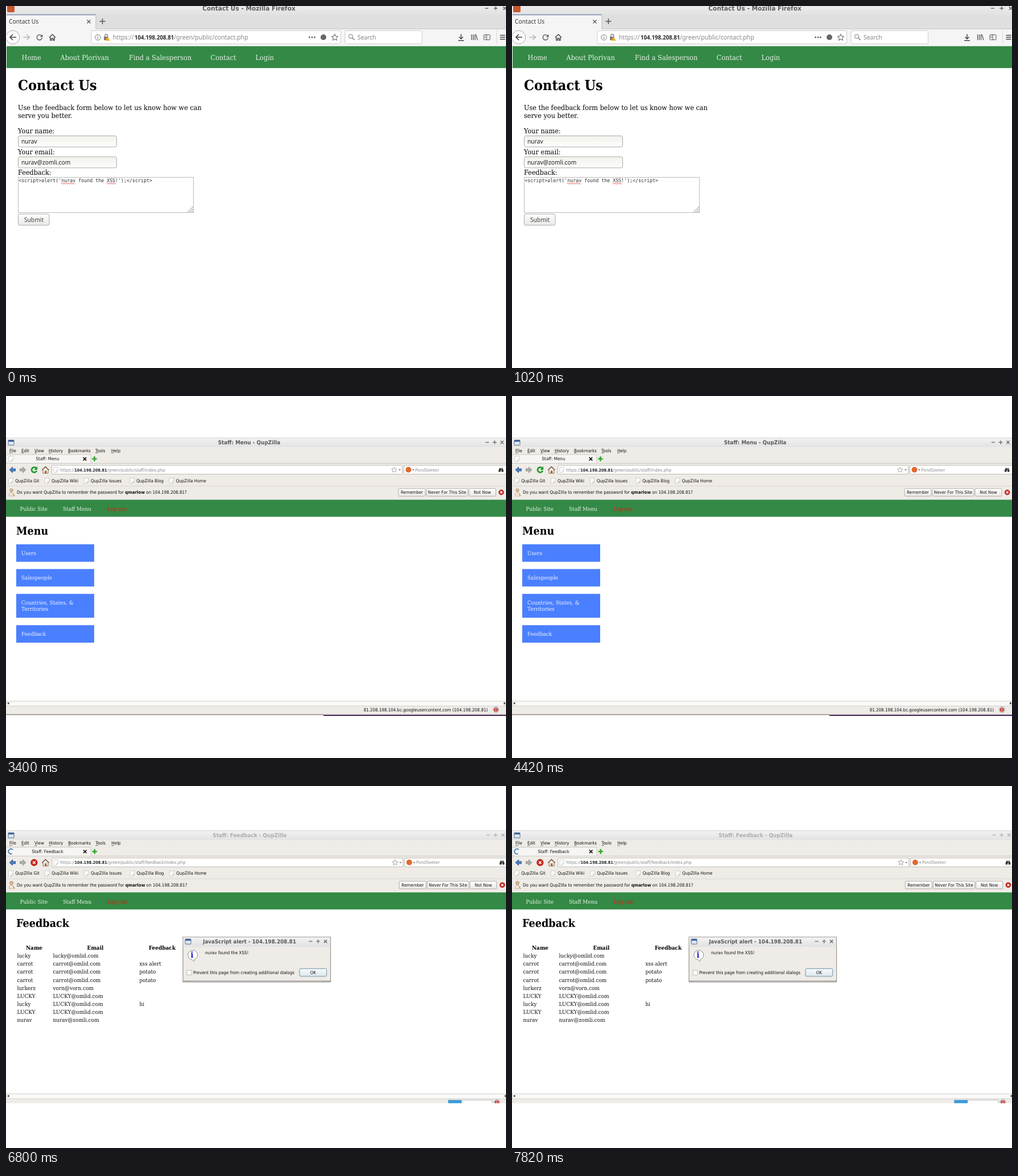
Animation of 879x637 px, one loop 8.5 s. Source, as an HTML page:

```html
<!DOCTYPE html>
<html lang="en">
<head>
<meta charset="utf-8">
<title>Feedback form walkthrough</title>
<style>
html, body { margin: 0; width: 100%; height: 100%; overflow: hidden; background: #fff }
svg { display: block; width: 879px; height: 637px }
text { text-rendering: geometricPrecision }
.serif { font-family: "DejaVu Serif", serif }
.sans { font-family: "DejaVu Sans", sans-serif }
.ui { font-family: "Noto Sans", "Open Sans", sans-serif }
.mono { font-family: "DejaVu Sans Mono", monospace }
.b { font-weight: bold }
.mid { text-anchor: middle }
.end { text-anchor: end }
</style>
</head>
<body>
<svg id="stage" viewBox="0 0 879 637"></svg>
<script>
const SQUEEZE = 0.917;
const HOLD = 1700;
const GREEN = '#338945', PANEL = '#efebe7', GREY = '#58585a';
const HOST = '104.198.208.81';

const text = (x, y, size, str, cls = 'sans', fill = '#111') =>
  `<text transform="translate(${x} ${y}) scale(${SQUEEZE} 1)" font-size="${size}" class="${cls}" fill="${fill}">${str}</text>`;
const rect = (x, y, w, h, fill, stroke = 'none', r = 0) =>
  `<rect x="${x}" y="${y}" width="${w}" height="${h}" fill="${fill}" stroke="${stroke}" rx="${r}"/>`;
const dot = (x, y, r, fill, stroke = 'none') =>
  `<circle cx="${x}" cy="${y}" r="${r}" fill="${fill}" stroke="${stroke}"/>`;
const path = (d, stroke = GREY, width = 1.3, fill = 'none') =>
  `<path d="${d}" fill="${fill}" stroke="${stroke}" stroke-width="${width}"/>`;
const solid = (d, fill) => path(d, 'none', 0, fill);
const group = (transform, ...parts) => `<g transform="${transform}">${parts.join('')}</g>`;
const cross = (x, y, r, color, w) =>
  path(`M${x - r} ${y - r}l${2 * r} ${2 * r}m0 ${-2 * r}l${-2 * r} ${2 * r}`, color, w);
const plus = (x, y, r, color, w) => path(`M${x - r} ${y}h${2 * r}M${x} ${y - r}v${2 * r}`, color, w);
const windowButtons = (x, y, gap, color) =>
  path(`M${x - 3} ${y}h6`, color, 1.4) + plus(x + gap, y, 3.3, color, 1.4) + cross(x + 2 * gap, y, 2.7, color, 1.5);
const each = (list, draw) => list.map(draw).join('');
const squiggle = (x, y, w) => path(`M${x} ${y}` + 'q1 -2 2 0t2 0'.repeat(Math.round(w / 4)), '#e02020', 0.9);
const magnifier = (x, y) => dot(x, y, 3.6, 'none', '#777') + path(`M${x + 2.6} ${y + 2.6}l4 4`, '#777', 1.4);
const star = (x, y, r, color) => {
  const points = Array.from({ length: 10 }, (_, i) => {
    const a = i * Math.PI / 5, d = i % 2 ? r * 0.48 : r;
    return `${(x + d * Math.sin(a)).toFixed(1)} ${(y - d * Math.cos(a)).toFixed(1)}`;
  });
  return path(`M${points.join('L')}Z`, color, 1);
};

// First browser
function visitor(title, file) {
  const input = '#fff', line = '#cdcdcd';
  return [
    rect(0, -12, 900, 27, 'url(#bar)'),
    rect(2, -2, 13, 13, '#c8572c', 'none', 2),
    text(427, 8, 11.5, `${title} - Mozilla Firefox`, 'sans b mid', '#5c5c5c'),
    windowButtons(845, 4, 15.8, '#666'),
    rect(0, 15, 900, 25.5, '#dfdfdf'),
    rect(0, 15, 158, 26, '#f5f5f5'), rect(0, 14.5, 158, 1.8, '#8d99b3'),
    path('M158 15v25.5H900', '#bdbdbd', 1),
    text(5, 31, 11.2, title, 'ui', '#3a3a3a'),
    cross(145.5, 27.5, 3, '#555', 1.3), plus(169.5, 27, 5, '#555', 1.5),
    rect(0, 40.8, 900, 30.4, '#f5f5f5'),
    dot(12, 55, 11.8, '#fcfcfc', '#aaa'),
    path('M18 55H7M12 50L7 55l5 5', '#444', 1.6),
    path('M30.5 55h10.5M36.5 50.5l5 4.5-5 4.5', '#b5b5b5', 1.5),
    path('M62.4 52.2a4.6 4.6 0 1 0 1 4', '#555', 1.4), solid('M64.5 50v4.6h-4.6z', '#555'),
    path('M76 55.5L81.5 50l5.5 5.5M78 55v5.3h2.2v-3.3h2.6v3.3H85V55', '#444', 1.4),
    rect(150, 43.5, 438.5, 23, input, line, 2),
    dot(161.5, 55.3, 4.8, 'none', '#777'), path('M161.5 54.5v3.5M161.5 52v1.3', '#777', 1.2),
    path('M173.8 54v-1.6a2.4 2.8 0 0 1 4.8 0V54', '#777', 1.3), rect(172.2, 54, 7.6, 6, '#777'),
    solid('M178.5 53.5l4.2 7.5h-8.4z', '#f0ae20'),
    text(188, 59.2, 11.6, 'https://', 'ui', '#888'),
    text(226, 59.2, 10.6, HOST, 'ui b', '#2b2b2b'),
    text(295, 59.2, 11.6, `/green/public/${file}`, 'ui', '#888'),
    each([533.5, 538, 542.5], x => dot(x, 55, 1.5, '#666')),
    dot(558, 55, 5, '#666'), star(578, 55.5, 6, '#555'),
    rect(596, 43.5, 135.5, 23, input, line, 2), magnifier(606, 53.5),
    text(618, 59.2, 11.2, 'Search', 'ui', '#858585'),
    path('M800 49.5v8M796.5 54.5l3.5 3.5 3.5-3.5M795 60.8h10', '#444', 1.5),
    path('M818.5 50v10M821.5 50v10M824.5 50v10M826 50l3 10', '#555', 1.3),
    rect(840, 50.5, 11, 9, 'none', '#555', 1.5), path('M845 50.5v9M841.5 53h2M841.5 55.5h2', '#555', 1),
    path('M862.5 43v24', '#d8d8d8', 1), path('M868.5 51.5h9M868.5 55h9M868.5 58.5h9', '#444', 1.5),
    rect(0, 70.7, 900, 38.5, GREEN),
    each([[27.5, 'Home'], [95.5, 'About Plorivan'], [216, 'Find a Salesperson'], [359.5, 'Contact'], [438.5, 'Login']],
      ([x, s]) => text(x, 95.3, 12.4, s, 'serif', '#e8f2e8')),
    text(21, 148.3, 24.6, title, 'serif b', '#000')
  ].join('');
}

const paragraph = (...lines) => each(lines, (s, i) => text(21, 182.6 + i * 14.6, 12.3, s, 'serif', '#000'));

function contactForm() {
  const field = (y, label, value) =>
    text(21, y - 4, 12.3, label, 'serif', '#000') +
    rect(21.5, y + .5, 173, 19.5, 'url(#field)', '#aaa', 3) + text(27, y + 14.2, 11.2, value, 'ui', '#222');
  return [
    paragraph('Use the feedback form below to let us know how we can', 'serve you better.'),
    field(228, 'Your name:', 'nurav'),
    field(264.8, 'Your email:', 'nurav@zomli.com'),
    text(21, 297.4, 12.3, 'Feedback:', 'serif', '#000'),
    rect(21.5, 301.5, 308, 62, '#fff', '#bbb'),
    text(22.3, 310.4, 9.06, "&lt;script&gt;alert('nurav found the XSS!');&lt;/script&gt;", 'mono', '#333'),
    squiggle(97, 312.5, 25), squiggle(177, 312.5, 15),
    path('M319 363l10-10M323 363l6-6M326.5 363l2.5-2.5', '#888', 1),
    rect(21.5, 366, 54.5, 19.8, 'url(#button)', '#aaa', 3),
    text(49, 380, 11.2, 'Submit', 'ui mid', '#444'),
    rect(0, 0, 1, 637, '#fff')
  ].join('');
}

// Second browser
const sheet = (x, y) => path(`M${x - 3.8} ${y - 4.5}h7.6v6l-3 3.5h-4.6zM${x + 3.8} ${y + 1.5}h-3v3.5`, '#bdbdbd', 0.7, '#fcfcfc');
const stop = (x, y, r) => dot(x, y, r, '#cf2a20', '#a8180f') + cross(x, y, r * .4, '#fff', 1.5);
const windowIcon = (x, y) => rect(x, y, 10, 9, '#dde6f1', '#5a6f8e', 1) + rect(x, y, 10, 3, '#3c659f');
const button = (x, y, w, label, stroke = '#b3afaa', fill = 'url(#button)') =>
  rect(x, y, w, 13.5, fill, stroke, 2) + text(x + w / 2, y + 9.6, 7.78, label, 'sans mid');

function staffWindow(page, url, busy) {
  const ink = busy ? '#adadad' : '#5a5a5a';
  const small = (x, y, s, cls, fill) => text(x, y, 7.78, s, cls, fill);
  const arrow = (x, dir, fill, edge) =>
    path(`M${x - 5.5 * dir} 130l${5.5 * dir} -5v3h${5 * dir}v4h${-5 * dir}v3z`, edge, 0.8, fill);
  return [
    rect(0, 73.5, 900, 17, 'url(#bar)'), path('M0 73.8H900', '#cfcfcf', .8),
    windowIcon(4, 77.5),
    text(427.5, 85, 9.7, `Staff: ${page} - QupZilla`, 'sans b mid', ink),
    windowButtons(846, 81.5, 13, busy ? '#b5b5b5' : '#707070'),
    rect(0, 90.5, 900, 92, PANEL),
    each([[6, 'File'], [27, 'Edit'], [50, 'View'], [75, 'History'], [109, 'Bookmarks'], [157, 'Tools'], [185, 'Help']],
      ([x, s]) => small(x, 98.7, s) + path(`M${x} 100.2h4.5`, '#333', .7)),
    rect(0, 103, 149, 15.5, '#f7f5f3', '#cbc6c0', 1), path('M149 118.5H900', '#cbc6c0', 1),
    busy ? path('M12 107.5A4.4 4.4 0 1 0 10.5 114.5', '#3e79b8', 1.8) : sheet(9, 110.5),
    small(73, 113.2, `Staff: ${page}`, 'sans mid'),
    cross(138.5, 110.7, 2.8, '#222', 1.8), plus(155.5, 110.5, 4.2, '#37a834', 2.6),
    arrow(11.5, 1, '#4b80c2', '#1f4c85'), arrow(29.5, -1, '#aab0aa', '#858c85'),
    busy ? stop(49.3, 130, 5.6)
      : path('M53 127a4.5 4.5 0 1 0 .8 4.5', '#249a35', 2.8) + solid('M55.2 123.8v6.2h-6z', '#249a35'),
    path('M65 130v6h9v-6', '#8a7050', 1, '#f5eddf'), path('M63.2 130.5l6.1-6 6.1 6', '#6b4a38', 1.4),
    rect(68.2, 131.5, 3, 4.5, '#9a5b2c'),
    rect(80.5, 122, 616, 15.5, '#fff', '#bfbab4', 1), sheet(87.5, 129.8),
    small(95, 132.6, 'https://', 'sans', '#888'),
    text(120.3, 132.6, 7.1, HOST, 'sans b', '#222'),
    small(177.3, 132.6, `/green/public/staff/${url}`, 'sans', '#888'),
    star(682.5, 130, 5, '#aaa'), solid('M690 129h4l-2 2.5z', '#777'),
    rect(699.5, 122, 190, 15.5, '#fff', '#bfbab4', 1),
    dot(707.5, 129.8, 5, '#e0692f'), solid('M714 129h4l-2 2.5z', '#777'),
    small(719.5, 132.6, 'PondSeeker', 'sans', '#909090'),
    solid('M866 133.5v-3l2-4h1.5v7zM874.5 133.5v-3l-2-4H871v7zM869 128h2.5v3H869z', '#333'),
    each([[8.5, 'Git'], [72.3, 'Wiki'], [141.2, 'Issues'], [221.5, 'Blog'], [291, 'Home']],
      ([x, s]) => sheet(x, 149) + small(x + 7.7, 151.7, `QupZilla ${s}`)),
    path('M0 158.5H900', '#d8d3cd', .8),
    dot(9.5, 166, 2.7, '#e4c09c', '#b08858'), path('M5.5 176v-4q4-4 8 0v4z', '#b5aaa0', .8, '#eee6dd'),
    path('M12 172l3.5 4', '#d89a48', 1.4),
    small(19, 172.3, `Do you want QupZilla to remember the password for <tspan class="b">qmarlow</tspan> on ${HOST}?`),
    button(690, 162.8, 47, 'Remember'), button(739, 162.8, 73, 'Never For This Site'), button(814, 162.8, 47, 'Not Now'),
    stop(870.7, 169.5, 4.3),
    rect(0, 182.5, 900, 30, GREEN),
    text(24.5, 202, 9.7, 'Public Site', 'serif', '#e8f2e8'),
    text(100, 202, 9.7, 'Staff Menu', 'serif', '#e8f2e8'),
    text(178, 202, 9.7, 'Log out', 'serif', '#e4180f'),
    text(18, 243.6, 19.2, page, 'serif b', '#000'),
    rect(0, 536.5, 900, 25, PANEL), rect(.5, 537, 877, 8.5, '#faf9f8', '#d5d1cc'),
    solid('M5.5 538.5v4.5l-3.5-2.2z', '#444'), solid('M875 538.5v4.5l3.5-2.2z', '#444'),
    busy
      ? rect(776, 548, 77, 12, '#fff', '#bbb') + rect(776, 548, 23.5, 12, '#399bdd')
      : small(847, 555, `81.208.198.104.bc.googleusercontent.com (${HOST})`, 'sans end'),
    dot(861.3, 552, 4.8, '#d9d4cf', '#999'), dot(861.3, 552, 3.3, '#c92b24'), path('M861.3 549.8v4', '#fff', 1.2)
  ].join('');
}

function menuPage() {
  const item = (y, h, ...lines) => rect(18, y, 137, h, '#4a7fff') +
    each(lines, (s, i) => text(27, y + 18.6 + i * 11.5, 9.7, s, 'serif', '#eef2ff'));
  return item(261, 30.7, 'Users') + item(304.5, 30.7, 'Salespeople') +
    item(348.2, 42, 'Countries, States, &amp;', 'Territories') + item(403.3, 30.7, 'Feedback') +
    rect(0, 559.8, 558, 1.6, '#98948f') + rect(558, 559.8, 321, 1.2, '#c9c4bf') + rect(558, 561, 321, 2, '#4b2a5e');
}

function table(y, centers, lefts, rows) {
  return each(['Name', 'Email', 'Feedback'], (s, i) => text(centers[i], y, 9.75, s, 'serif b mid', '#000')) +
    each(rows, (row, r) => each(row, (s, i) => text(lefts[i], y + 14.15 * (r + 1), 9.75, s, 'serif')));
}

function dialog(message) {
  return [
    rect(310.5, 266.5, 259.5, 79, PANEL, '#85827f'), rect(311, 267, 258.5, 16.5, 'url(#bar)'),
    rect(311, 343, 258.5, 2.5, '#a9a6a3'), rect(326, 343, 229, 1.2, '#c4c0bc'),
    windowIcon(314.5, 269.8),
    text(427.5, 277.6, 9.6, `JavaScript alert - ${HOST}`, 'sans b mid', '#5a5a5a'),
    windowButtons(535, 274, 13, '#707070'),
    path('M331 305.5l-1 4-4-3.5a8.5 8.2 0 1 1 5-.5z', '#8d8d8d', 1, '#fff'),
    text(326.4, 303, 14.5, 'i', 'serif b mid', '#1a1ad0'),
    text(349.5, 297, 7.78, message),
    rect(317.5, 325, 8, 8, '#fff', '#c2beb9'),
    text(328.3, 331.6, 7.78, 'Prevent this page from creating additional dialogs'),
    button(515.5, 322, 47.5, 'OK', '#6f93a8', 'url(#focus)')
  ].join('');
}

const feedback = [
  ['lucky', 'lucky@omlid.com'],
  ['carrot', 'carrot@omlid.com', 'xss alert'],
  ['carrot', 'carrot@omlid.com', 'potato'],
  ['carrot', 'carrot@omlid.com', 'potato'],
  ['lurkerz', 'vorn@vorn.com'],
  ['LUCKY', 'LUCKY@omlid.com'],
  ['lucky', 'LUCKY@omlid.com', 'hi'],
  ['LUCKY', 'LUCKY@omlid.com'],
  ['nurav', 'nurav@zomli.com']
];
const busyWindow = () => staffWindow('Feedback', 'feedback/index.php', true);

const scenes = [
  visitor('Contact Us', 'contact.php') + contactForm(),
  group('translate(0 8.2) scale(.9926)', visitor('Feedback Received', 'feedback_received.php'),
    paragraph('Thank you for submitting feedback. We hope to be able to use', 'it to serve you better.')) +
    rect(0, 0, 879, 1, '#fff') + rect(0, 1, 879, 2, '#4b2a5e'),
  staffWindow('Menu', 'index.php', false) + menuPage(),
  group('translate(0 5.2) scale(1.001 1)', busyWindow()) + rect(0, 557.5, 879, 80, '#fff') +
    table(288.6, [47, 150, 270], [19.5, 77, 229], feedback.slice(0, 1)) + dialog('XSS ALERT'),
  group('translate(0 4.7) scale(1.002 1)', busyWindow()) + rect(0, 558.2, 879, 80, '#fff') +
    table(288, [49.5, 157, 274.5], [19.5, 82.5, 234.5], feedback) +
    group('translate(.6 -.6)', dialog('nurav found the XSS!'))
];

const gradient = (id, top, bottom) =>
  `<linearGradient id="${id}" x2="0" y2="1"><stop stop-color="${top}"/><stop offset="1" stop-color="${bottom}"/></linearGradient>`;
const defs = gradient('bar', '#f2f2f2', '#e2e2e2') + gradient('button', '#fefefe', '#ebe9e7') +
  gradient('field', '#f1f2ec', '#fdfdfb') + gradient('focus', '#f8fbfc', '#dde7ec');
const stage = document.getElementById('stage');
stage.innerHTML = `<defs>${defs}</defs>` + each(scenes, s => `<g class="scene">${s}</g>`);
const layers = [...stage.querySelectorAll('.scene')];

function show() {
  const current = Math.floor(performance.now() / HOLD) % layers.length;
  layers.forEach((layer, i) => { layer.style.display = i === current ? '' : 'none'; });
  requestAnimationFrame(show);
}
show();
</script>
</body>
</html>
```
